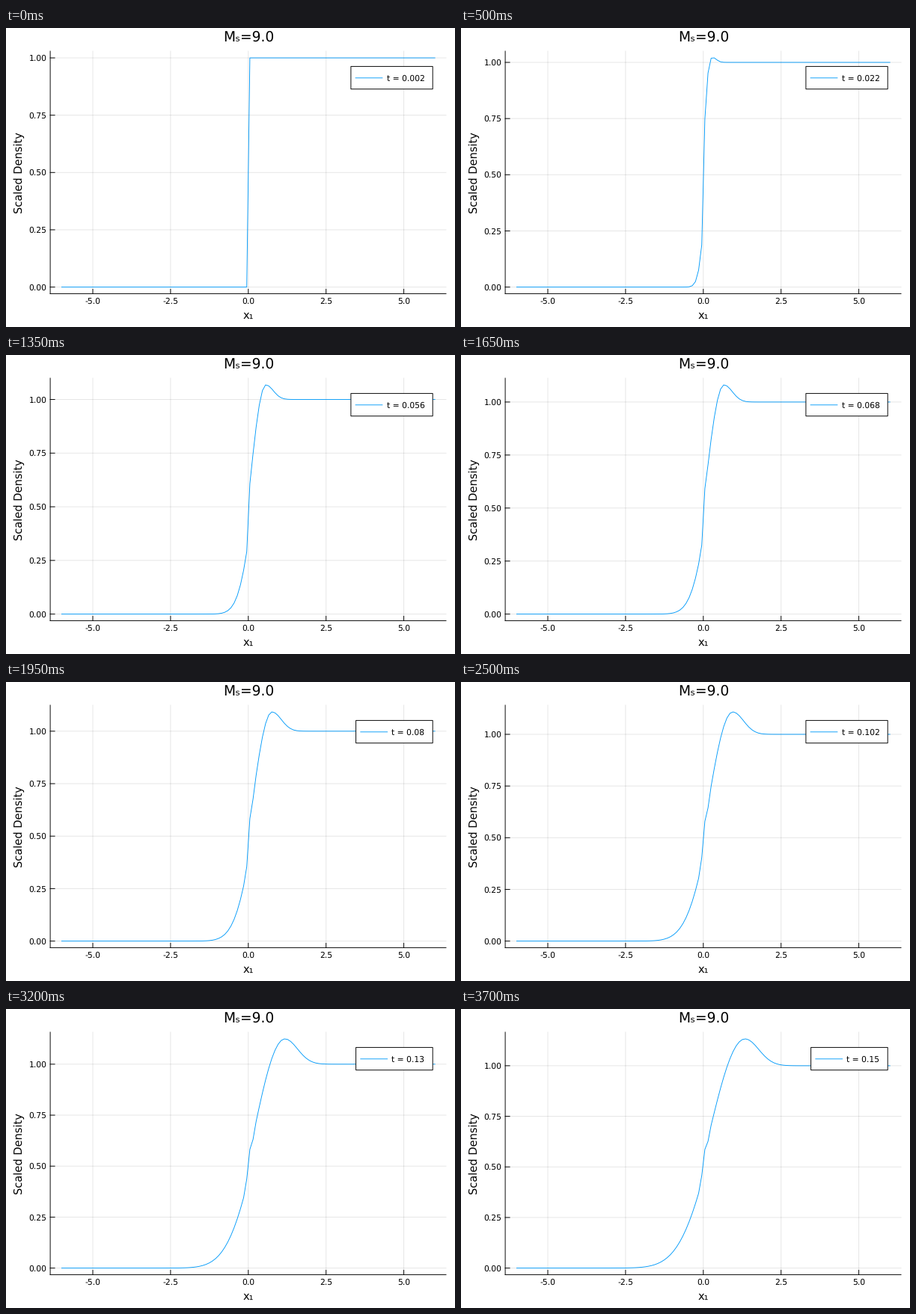
These frames come from a looping animation (600x400 px, 3750 ms). A matplotlib script:

```python
import math

import numpy as np
import matplotlib.pyplot as plt
from matplotlib.animation import FuncAnimation
from matplotlib.patches import Rectangle

W, H, DPI = 600, 400, 100
FRAMES, INTERVAL = 75, 50
PX = 72 / DPI  # points per pixel

LEFT, RIGHT, TOP, BOTTOM = 59.1, 588, 31, 355.4
X0, X_UNIT = 323.8, 41.56
Y0, Y_SPAN = 346.6, 306.6
BOX_RIGHT, BOX_TOP, BOX_HEIGHT = 570.2, 51.4, 30.3
BLUE = "#009afa"
SMALL, MEDIUM, LARGE = 10.8, 14.6, 18.6

plt.rcParams["font.family"] = "DejaVu Sans"
plt.rcParams["text.hinting"] = "none"
fig = plt.figure(figsize=(W / DPI, H / DPI), dpi=DPI, facecolor="white")
ax = fig.add_axes([0, 0, 1, 1])
ax.set_xlim(0, W)
ax.set_ylim(H, 0)
ax.axis("off")

phi = np.vectorize(lambda z: 0.5 * (1 + math.erf(z / math.sqrt(2))))
grid_x = np.linspace(-6, 6, 120)


def density(step):
    """Scaled density on the grid: a Gaussian foot, a rise and an overshoot."""
    n = max(step, 1e-3)
    half = len(grid_x) // 2
    kink = np.clip((n - 27) / 23, 0, 1)

    # Gas leaking upstream
    spread = 0.2 * (n / 10) ** 0.73
    y = 1.35 * phi(grid_x / spread - 0.98 / (1 + n / 57))
    y[half - 1] += 0.033 * kink

    # Steep rise to a peak that drifts downstream, then a Gaussian fall
    r = grid_x[half:]
    gain = 0.19 / (1 + (40.8 / n) ** 1.41)
    foot = 0.545 + 0.455 * math.exp(-n / 12) + 0.00055 * n
    peak = 0.12 + 0.0165 * n
    width = 0.15 * (n / 10) ** 0.62
    power = 1.07 - 0.6 * math.exp(-((n / 18) ** 2))
    p = np.clip((r - r[0]) / (peak - r[0]), 0, 1)
    rise = foot + (1 + gain - foot) * np.sin(p * np.pi / 2) ** power
    fall = 1 + gain * 2.0 ** -(((r - peak) / width) ** 2)
    y[half:] = np.where(r < peak, rise, fall)
    y[half + 1] -= 0.018 * kink
    return y


def line(xs, ys, color="black", width=0.95, **kw):
    return ax.plot(xs, ys, color=color, lw=width * PX, snap=False, **kw)[0]


def grid_line(xs, ys):
    return line(xs, ys, alpha=0.1, zorder=1)


def label(x, y, s, size, **kw):
    kw = {"ha": "center", "va": "baseline", **kw}
    return ax.text(x, y, s, fontsize=size * PX, color="black", **kw)


# Fixed axes and labels
for v in np.arange(-5, 5.1, 2.5):
    px = X0 + X_UNIT * v
    grid_line([px, px], [TOP, BOTTOM])
    line([px, px], [BOTTOM, BOTTOM - 6], zorder=2)
    label(px, 369.3, f"{v:.1f}", SMALL)
line([LEFT, LEFT], [TOP, BOTTOM], zorder=2)
line([LEFT, RIGHT], [BOTTOM, BOTTOM], zorder=2)
label(X0, 18.2, "Mₛ=9.0", LARGE)
label(X0, 388.6, "x₁", MEDIUM)
label(25.3, 193.5, "Scaled Density", MEDIUM, rotation=90, ha="right",
      va="center")

# Moving parts
levels = np.linspace(0, 1, 5)
rows = [(grid_line([LEFT, RIGHT], [0, 0]),
         line([LEFT, LEFT + 6], [0, 0], zorder=2),
         label(54.3, 0, f"{v:.2f}", SMALL, ha="right")) for v in levels]
curve = line(X0 + X_UNIT * grid_x, np.zeros_like(grid_x), BLUE, 0.9, zorder=3)

box = ax.add_patch(Rectangle((0, BOX_TOP), 0, BOX_HEIGHT, fc="white",
                             ec="black", lw=0.95 * PX, snap=False, zorder=5))
key = line([0, 0], [66.8, 66.8], BLUE, 0.9, zorder=6)
key_text = label(0, 71, "", SMALL, ha="left", zorder=6)


def draw(n):
    y = density(n)
    scale = Y_SPAN / y.max()
    curve.set_ydata(Y0 - scale * y)
    for v, (rule, tick, text) in zip(levels, rows):
        py = Y0 - scale * v
        rule.set_ydata([py, py])
        tick.set_ydata([py, py])
        text.set_y(py + 4)

    # The legend box shrinks with its caption
    caption = f"t = {round(0.002 * (n + 1), 3)}"
    left = BOX_RIGHT - 49 - 6.7 * len(caption)
    box.set_x(left)
    box.set_width(BOX_RIGHT - left)
    key.set_xdata([left + 6.2, left + 42])
    key_text.set_x(left + 47.6)
    key_text.set_text(caption)
    return []


anim = FuncAnimation(fig, draw, frames=FRAMES, interval=INTERVAL,
                     repeat=True, repeat_delay=0, blit=False)
plt.show()
```
